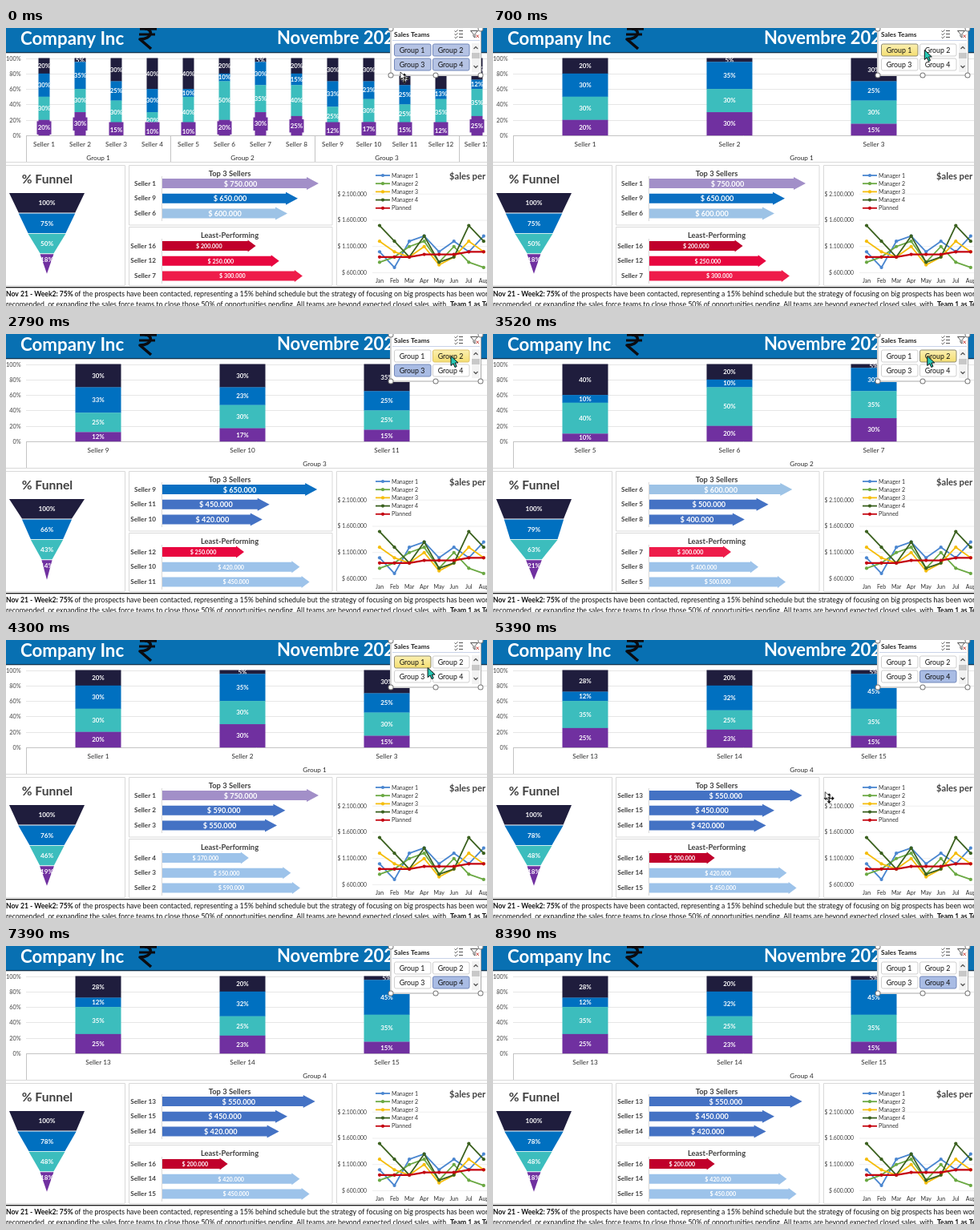
Animation of 600x347 px, one loop 8.52 s. Source, as an HTML page with a canvas:

```html
<!DOCTYPE html>
<html lang="en">
<head>
<meta charset="utf-8">
<title>Sales dashboard</title>
<style>
html, body { margin: 0; width: 100%; height: 100%; overflow: hidden; background: #fff; }
canvas { display: block; width: 600px; height: 347px; }
</style>
</head>
<body>
<canvas id="stage"></canvas>
<script>
const W = 600, H = 347, LOOP = 8520;
const canvas = document.getElementById('stage');
const ctx = canvas.getContext('2d');
const dpr = window.devicePixelRatio || 1;
canvas.width = W * dpr;
canvas.height = H * dpr;

const INK = '#404040', LINE = '#d9d9d9';
const SHADES = ['#1f1d3d', '#0070c0', '#3cbdbd', '#7030a0'];

// Four sellers per group: sales in thousands, then the three lower stage shares
const SELLERS = [
  [750, 30, 30, 20], [590, 35, 30, 30], [550, 25, 30, 15], [370, 30, 20, 10],
  [500, 10, 40, 10], [600, 10, 50, 20], [300, 30, 35, 30], [400, 15, 40, 25],
  [650, 33, 25, 12], [420, 23, 30, 17], [450, 25, 25, 15], [250, 13, 35, 12],
  [550, 12, 35, 25], [420, 32, 25, 23], [450, 45, 35, 15], [200, 30, 25, 10]
].map(([sales, ...low], i) => ({
  id: i + 1, sales, shares: [100 - low.reduce((a, b) => a + b), ...low]
}));
const ACCENTS = {
  1: '#a28fc8', 9: '#0a6fc2', 6: '#9dc3e6',
  16: '#c0002b', 12: '#e8063f', 7: '#ee1c4a'
};

// Monthly sales in hundred thousands, repeating
const MONTHS = ['Jan', 'Feb', 'Mar', 'Apr', 'May', 'Jun', 'Jul', 'Aug'];
const cycle = list => i => list[i % list.length];
const SERIES = [
  ['Manager 1', '#4a86d0', cycle([10, 7, 12, 13, 10, 12, 10, 13])],
  ['Manager 2', '#6aa842', cycle([8, 9, 11, 12, 8, 11, 8, 7])],
  ['Manager 3', '#f5bd0c', cycle([12, 10, 9, 11, 7.5, 9])],
  ['Manager 4', '#3b611f', cycle([15, 12, 9, 13, 8, 9])],
  ['Planned', '#c40510', i => 9 + Math.floor(i / 3) / 2]
];

// Moments the pointer sets off, and the button it then clicks
const TRIPS = [[0, 1], [490, 2], [1700, 3], [2420, 2], [3400, 1], [4150, 4], [5050, 0]];
const TRAVEL = 350, PRESS = 60, HIDE = 5700;

const buttonPos = g => [484 + (g - 1) % 2 * 48, 19.5 + (g > 2 ? 18 : 0)];
const members = g => g ? SELLERS.slice(g * 4 - 4, g * 4) : SELLERS;
const selectedAt = t => TRIPS.reduce((g, [at, to]) => to && t >= at + TRAVEL + PRESS ? to : g, 0);

function pointerAt(t) {
  if (t > HIDE) return null;
  let pos = [497, 63];
  for (const [at, to] of TRIPS) {
    if (t < at) break;
    const [bx, by] = buttonPos(to);
    const goal = to ? [bx + 23, by + 8] : [419, 198];
    const k = Math.min(1, (t - at) / TRAVEL), ease = k * k * (3 - 2 * k);
    pos = pos.map((p, i) => p + (goal[i] - p) * ease);
  }
  return pos;
}

function rect(x, y, w, h, fill) {
  ctx.fillStyle = fill;
  ctx.fillRect(x, y, w, h);
}

function trace(points, close) {
  ctx.beginPath();
  points.forEach(([x, y]) => ctx.lineTo(x, y));
  if (close) ctx.closePath();
}

function poly(points, fill) {
  trace(points, true);
  ctx.fillStyle = fill;
  ctx.fill();
}

function stroke(points, color, width = 1) {
  trace(points);
  ctx.strokeStyle = color;
  ctx.lineWidth = width;
  ctx.stroke();
}

function box(x, y, w, h, color, r = 0) {
  ctx.beginPath();
  ctx.roundRect(x, y, w, h, r);
  ctx.strokeStyle = color;
  ctx.lineWidth = 1;
  ctx.stroke();
}

function disc(x, y, r, fill) {
  ctx.beginPath();
  ctx.arc(x, y, r, 0, Math.PI * 2);
  ctx.fillStyle = fill;
  ctx.fill();
}

// y is the middle of the capitals
function text(s, x, y, size, { color = INK, align = 'left', bold = false } = {}) {
  ctx.font = `${bold ? 700 : 400} ${size}px Lato, Roboto, sans-serif`;
  ctx.textAlign = align;
  ctx.fillStyle = color;
  ctx.fillText(s, x, y + size * 0.36);
}

const white = { color: '#fff', align: 'center', bold: true };
const center = { align: 'center', color: '#2c2c2c' };
const heading = { align: 'center', bold: true };

function drawHeader() {
  const title = { color: '#fff', bold: true };
  rect(0, 0, W, 31, '#0870b2');
  rect(0, 30, W, 1.3, '#10324d');
  text('Company Inc', 18, 12.5, 22.3, title);
  text('Novembre 2021', 338, 12.5, 22, title);
  // Rupee sign
  stroke([[167, 1], [188, 1]], '#0b0b0f', 3.4);
  stroke([[166, 8], [186, 8]], '#0b0b0f', 3);
  ctx.beginPath();
  ctx.moveTo(173, 1);
  ctx.bezierCurveTo(184, 1, 183, 14, 167, 14);
  ctx.lineTo(181, 26);
  ctx.lineWidth = 3.6;
  ctx.stroke();
}

function drawBars(view) {
  const base = 134, full = 96.5;
  for (let p = 0; p <= 100; p += 20) {
    const y = Math.round(base - full * p / 100) + 0.5;
    stroke([[25, y], [W, y]], p ? '#e6e6e6' : '#c4c4c4');
    text(p + '%', 18.5, y - 0.5, 7.3, { align: 'right' });
  }
  const step = view ? 180 : 45, barW = view ? 57 : 14;
  members(view).slice(0, view ? 3 : 13).forEach(({ id, shares }, i) => {
    const x = 25 + step * (i + 0.5);
    let y = base - full;
    shares.forEach((share, k) => {
      const h = full * share / 100, mid = y + h / 2;
      rect(x - barW / 2, y, barW, h + 0.2, SHADES[k]);
      // Labels wider than the bar get a plate
      if (k === 3 && barW < 18) rect(x - 9, Math.min(mid - 8, base - 16.5), 18, 16.5, SHADES[3]);
      text(share + '%', x, mid, 7.9, white);
      y += h;
    });
    text('Seller ' + id, x, 145, 8.2, center);
  });
  const span = step * 4;
  for (let g = 0; 25 + g * span < W; g++) {
    const x = 25 + g * span;
    stroke([[x + 0.5, 134], [x + 0.5, 167]], '#c4c4c4');
    text('Group ' + (view || g + 1), x + span / 2, 161.7, 8.2, center);
  }
  stroke([[0, 167.5], [W, 167.5]], LINE);
}

function drawFunnel(view) {
  box(-2, 171.5, 150.5, 150, LINE);
  text('% Funnel', 51.5, 188, 15.6, heading);
  const team = members(view);
  // Share of prospects that reach each stage or go beyond it
  const reach = SHADES.map((_, k) => {
    const sum = team.reduce((s, m) => s + m.shares.slice(k).reduce((a, b) => a + b), 0);
    return Math.round(sum / team.length);
  });
  reach.forEach((value, k) => {
    const y = 206 + k * 25.4, end = y + 24.5;
    const a = value * 0.47, b = (reach[k + 1] || 0) * 0.47;
    poly([[51 - a, y], [51 + a, y], [51 + b, end], [51 - b, end]], SHADES[k]);
    text(value + '%', 51, y + (k < 3 ? 12.3 : 6.5), 8.2, white);
  });
}

function arrow(y, width, body, head, len, fill) {
  const x = 195, neck = x + width - len, tip = x + width;
  poly([[x, y - body], [neck, y - body], [neck, y - head], [tip, y],
    [neck, y + head], [neck, y + body], [x, y + body]], fill);
}

function drawRanking(view, sign, opt) {
  const rows = [...members(view)].sort((a, b) => sign * (a.sales - b.sales)).slice(0, 3);
  box(153.5, opt.top, 253.5, opt.height, LINE);
  text(opt.title, 279, opt.top + 10.5, 9.4, heading);
  const peak = Math.max(...rows.map(r => r.sales)) * 1.05;
  const unit = peak > 320 ? 100 : 50;
  const scale = opt.width / (Math.ceil(peak / unit) * unit);
  rows.forEach(({ id, sales }, i) => {
    const y = opt.y + i * 18.8, w = sales * scale;
    arrow(y, w, opt.body, opt.head, opt.len, ACCENTS[id] || opt.plain);
    text('Seller ' + id, 187, y - 0.3, 8.2, { align: 'right', bold: true });
    text('$ ' + sales + '.000', 195 + w / 2, y + 0.3, opt.size, white);
  });
  stroke([[194.5, opt.y - 9], [194.5, opt.y + 47]], LINE);
}

function drawLines() {
  const px = i => 466 + i * 18.55, py = v => 305.5 - (v - 6) * 6.55;
  box(412.5, 171.5, 200, 150, LINE);
  text('$ales per month', 553, 185, 11.2, { bold: true });
  for (let v = 6; v <= 21; v += 5) {
    const label = (v > 9 ? Math.floor(v / 10) + '.' : '') + v % 10 + '00.000';
    stroke([[457, py(v)], [W, py(v)]], '#eeeeee');
    text('$ ' + label, 450, py(v), 6.8, { align: 'right' });
  }
  MONTHS.forEach((m, i) => text(m, px(i), 315, 7, center));
  ctx.lineJoin = 'round';
  SERIES.forEach(([name, color, value], k) => {
    const points = MONTHS.map((_, i) => [px(i), py(value(i))]);
    stroke(points, color, k === 4 ? 2.3 : 1.8);
    points.forEach(([x, y]) => disc(x, y, 2.1, color));
    const ly = 184 + k * 10.2;
    stroke([[461, ly], [479, ly]], color, 1.8);
    disc(470, ly, 2.1, color);
    text(name, 481, ly, 7, { color: '#333' });
  });
}

function drawNotes() {
  const ink = { color: '#111' }, strong = { color: '#111', bold: true };
  rect(0, 323, W, 1.4, '#222');
  text('Nov 21 - Week2: 75%', 0, 331.5, 8.6, strong);
  text('of the prospects have been contacted, representing a 15% behind schedule but the strategy of focusing on big prospects has been working', 85.5, 331.5, 8.77, ink);
  text('recomended, or expanding the sales force teams to close those 50% of opportunities pending. All teams are beyond expected closed sales, with', 0, 345, 8.77, ink);
  text('Team 1 as Team', 554, 345, 8.6, strong);
}

function drawButton(group, selected, hover) {
  const [x, y] = buttonPos(group);
  const on = selected === 0 || selected === group;
  let fill = '#fff', edge = '#cfcfcf';
  if (on) {
    fill = selected ? '#a9bce4' : '#b5c3e4';
    edge = '#7388ba';
  }
  if (hover) {
    fill = ctx.createLinearGradient(0, y, 0, y + 15);
    fill.addColorStop(0, '#fbf0b4');
    fill.addColorStop(1, '#f5df74');
    edge = on ? '#8d8a72' : '#dfc36a';
  }
  ctx.beginPath();
  ctx.roundRect(x + 0.5, y + 0.5, 45.5, 15, 2);
  ctx.fillStyle = fill;
  ctx.fill();
  box(x + 0.5, y + 0.5, 45.5, 15, edge, 2);
  text('Group ' + group, x + 22.5, y + 8, 8.8, { align: 'center', color: '#111' });
}

function drawSlicer(t, selected) {
  rect(479, 0, 114, 60, '#fff');
  box(480, -2, 112.5, 61, '#a8a8a8', 2);
  text('Sales Teams', 484, 7.7, 8.4, { color: '#222', bold: true });
  stroke([[482, 15.5], [591, 15.5]], '#c9d3e8');
  // Multi-select and clear-filter icons
  for (let y = 3.5; y < 12; y += 4) {
    stroke([[559.5, y], [561, y + 1.4], [563.5, y - 1.4]], '#555', 0.9);
    stroke([[565, y], [570, y]], '#555');
  }
  trace([[579.5, 3.5], [588.5, 3.5], [585, 7.5], [585, 12], [583, 10.5], [583, 7.5]], true);
  ctx.strokeStyle = '#555';
  ctx.stroke();
  stroke([[586.5, 8.5], [590, 12]], '#c8403a');
  stroke([[590, 8.5], [586.5, 12]], '#c8403a');

  // The highlight trails the pointer a little
  const p = pointerAt(Math.max(0, t - 120));
  for (let g = 1; g <= 4; g++) {
    const [x, y] = buttonPos(g);
    const over = p && p[0] >= x && p[0] < x + 47 && p[1] >= y && p[1] < y + 17;
    drawButton(g, selected, over);
  }
  rect(581, 19, 10, 36, '#f2f2f2');
  rect(581, 31, 10, 7, '#c8c8c8');
  stroke([[583.5, 26], [586, 23.5], [588.5, 26]], '#555', 1.2);
  stroke([[583.5, 47], [586, 49.5], [588.5, 47]], '#555', 1.2);
  [[480, 1], [592, 1], [480, 59], [536, 59], [592, 59]].forEach(([x, y]) => {
    disc(x, y, 3.5, '#777');
    disc(x, y, 2.5, '#fff');
  });
}

function drawPointer(t) {
  const p = pointerAt(t);
  if (!p) return;
  const inside = p[0] > 480 && p[0] < 592 && p[1] < 57;
  ctx.save();
  ctx.translate(p[0], p[1]);
  if (!inside) {
    const tip = [[0, -6.5], [2.6, -3.5], [-2.6, -3.5]];
    for (const [pad, color] of [[2.4, '#fff'], [0, '#111']]) {
      for (let i = 0; i < 4; i++) {
        stroke([[0, 0], [0, -5]], color, 1.2 + pad);
        poly(tip, color);
        ctx.rotate(Math.PI / 2);
      }
    }
    ctx.translate(-5, -8);
    ctx.scale(0.75, 0.75);
  }
  poly([[0, 0], [0, 12], [3, 9.4], [5, 14], [7.2, 13], [5.2, 8.6], [9, 8.4]], inside ? '#27c8b4' : '#fff');
  ctx.strokeStyle = '#111';
  ctx.lineWidth = 1;
  ctx.stroke();
  ctx.restore();
}

function draw(t) {
  ctx.setTransform(dpr, 0, 0, dpr, 0, 0);
  rect(0, 0, W, H, '#fff');
  // Bars refresh first, the other charts a moment later
  const late = selectedAt(t - 320);
  drawHeader();
  drawBars(selectedAt(t - 80));
  drawFunnel(late);
  drawRanking(late, -1, {
    title: 'Top 3 Sellers', top: 171.5, height: 74.5, y: 194, width: 208,
    body: 6, head: 8, len: 15, size: 9.2, plain: '#4472c4'
  });
  drawRanking(late, 1, {
    title: 'Least-Performing', top: 248.5, height: 73, y: 272, width: 204,
    body: 6, head: 7.5, len: 10, size: 7.2, plain: '#9dc3ea'
  });
  drawLines();
  drawNotes();
  drawSlicer(t, selectedAt(t));
  drawPointer(t);
}

const start = performance.now();
function tick(now) {
  draw(Math.max(0, now - start) % LOOP);
  requestAnimationFrame(tick);
}
draw(0);
requestAnimationFrame(tick);
</script>
</body>
</html>
```
